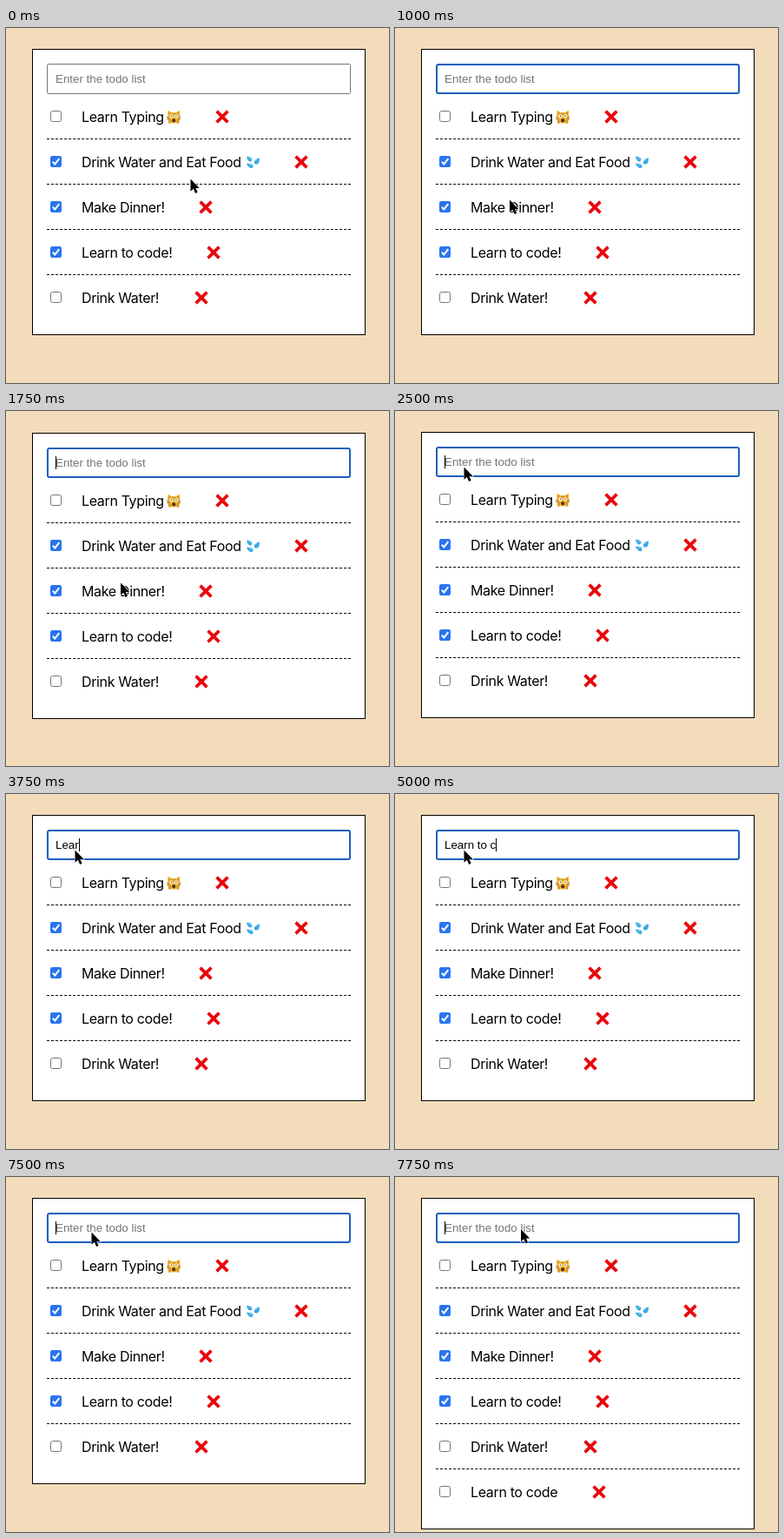
These frames come from a looping animation (441x408 px, 8000 ms). An HTML page:

```html
<!DOCTYPE html>
<html lang="en">
<head>
<meta charset="utf-8">
<title>Todo list</title>
<style>
  html, body { margin: 0; width: 100%; height: 100%; overflow: hidden; background: #f2dcb9; }
  svg { display: block; width: 441px; height: 408px; }
  .item { font: 16px Inter, sans-serif; letter-spacing: -0.35px; }
  .field { font: 13.333px "Liberation Sans", Arial, sans-serif; }
</style>
</head>
<body>
<svg viewBox="0 0 441 408">
  <defs>
    <g id="cross" stroke="#ea060b" stroke-width="3.7">
      <path d="M-6.4-6.4 6.4 6.4M6.4-6.4-6.4 6.4"/>
    </g>
    <g id="off">
      <rect x="51.5" y="-6.5" width="12" height="12" rx="2.2" fill="#fff" stroke="#767676"/>
    </g>
    <g id="on">
      <rect x="51" y="-7" width="13" height="13" rx="2.2" fill="#2874f0"/>
      <path d="M53.8-.3 56.4 2.4 61.3-3.8" fill="none" stroke="#fff" stroke-width="2"/>
    </g>
    <g id="cat">
      <path d="M1.4.6 6 3.2H10.4L15 .6 15.4 9Q14.5 15.5 8.2 15.6 2 15.5 1 9Z" fill="#f4b92f"/>
      <path d="M2.3 2.2 4.8 3.8 2.4 6ZM14.1 2.2 11.6 3.8 14 6Z" fill="#c98a3c"/>
      <path d="M6.8 3.3 7.4 5.4M9.6 3.3 9 5.4M0 8.2 3 9M0 10.6 3 10.4M16.4 8.2 13.4 9M16.4 10.6 13.4 10.4" stroke="#8a5a20" stroke-width=".7"/>
      <circle cx="5.4" cy="7.3" r="1.9" fill="#fff"/><circle cx="11" cy="7.3" r="1.9" fill="#fff"/>
      <circle cx="5.5" cy="7.3" r=".8" fill="#333"/><circle cx="10.9" cy="7.3" r=".8" fill="#333"/>
      <ellipse cx="8.2" cy="12.2" rx="2" ry="2.3" fill="#55301c"/>
      <path d="M2.4 15.8Q1 11.8 3.2 10L5.2 11.5 4.6 15.8ZM14 15.8Q15.4 11.8 13.2 10L11.2 11.5 11.8 15.8Z" fill="#d9992a"/>
    </g>
    <g id="drops" fill="#35a8e6">
      <path d="M1 1.5Q7.5 2 7.3 5.4 6.8 8 4.3 7.3 1.8 6.2 1 1.5Z"/>
      <path d="M15.8 3.2Q16.4 9.6 13 10.6 9.8 10.8 9.7 8 10 5.2 15.8 3.2Z"/>
      <path d="M.8 9.8Q6.6 9.2 8.2 11.6 9.2 14.6 6.6 15.2 3.4 15.2.8 9.8Z"/>
      <path d="M11 6.8Q11.6 5.8 13.2 5.2M3.6 3.4Q5.2 3.6 5.6 4.8M4 11.2Q6 11.2 6.8 12.4" fill="none" stroke="#a9def8" stroke-width=".9"/>
    </g>
  </defs>
  <rect width="441" height="408" fill="#f2dcb9"/>
  <g id="page">
    <rect id="card" x="30.5" y="24.5" width="383" height="328" fill="#fff" stroke="#000"/>
    <rect id="box" fill="#fff"/>
    <text id="entry" class="field" x="57" y="63" xml:space="preserve"></text>
    <rect id="caret" y="51" width="1" height="15"/>
    <g id="list"></g>
  </g>
  <path id="arrow" d="M0 0V14.2L3.3 11.3 5.6 16.4 8.1 15.3 5.9 10.4H10.2Z" fill="#000" stroke="#fff" stroke-width="1.1" paint-order="stroke"/>
</svg>
<script>
const LOOP = 8000, STEP = 250, ROW = 52;
const $ = id => document.getElementById(id);
const set = (el, attrs) => { for (const k in attrs) el.setAttribute(k, attrs[k]); };

// label, checked, cross centre, emoji, emoji x
const items = [
  ["Learn Typing", false, 249, "cat", 185],
  ["Drink Water and Eat Food", true, 340, "drops", 276],
  ["Make Dinner!", true, 230],
  ["Learn to code!", true, 239],
  ["Drink Water!", false, 225],
  ["Learn to code", false, 235]
];

$("list").innerHTML = items.map(([label, done, cross, icon, x], i) => {
  const y = 102 + i * ROW;
  return `<g>
    ${i ? `<path d="M47 ${y - 26.5}H397" stroke="#000" stroke-dasharray="3 2.03"/>` : ""}
    <use href="#${done ? "on" : "off"}" y="${y}"/>
    <text class="item" x="87" y="${y + 6}">${label}</text>
    ${icon ? `<use href="#${icon}" x="${x}" y="${y - 8}"/>` : ""}
    <use href="#cross" x="${cross}" y="${y}"/>
  </g>`;
}).join("");
const added = $("list").lastElementChild;

// time, x, y of the pointer
const moves = [
  [0, 212.5, 173.5], [250, 176, 112], [500, 134, 62], [750, 132, 130], [1000, 132, 197.5],
  [2000, 118, 160], [2250, 92, 96], [2500, 79.5, 64.5],
  [7250, 84, 64.5], [7500, 98.5, 63.5], [7750, 145, 60]
];
// time, typed length
const phrase = "Learn to code";
const keys = [
  [0, 0], [3000, 1], [3250, 2], [3500, 3], [3750, 4], [4000, 5], [4250, 6],
  [4750, 8], [5000, 10], [5250, 11], [5500, 13], [7250, 0]
];
const at = (track, t) => track.filter(k => k[0] <= t).pop();

function caretOn(t) {
  if (t < 500) return false;
  if (t < 3000) return (t - 500) % 1000 < 500;
  if (t < 5500) return true;
  if (t < 7250) return (t - 5500) % 1000 < 500;
  return true;
}

function draw(time) {
  const t = Math.floor(time % LOOP / STEP) * STEP;
  const focus = t >= 500, full = t >= 7750;
  const text = phrase.slice(0, at(keys, t)[1]);
  const [, x, y] = at(moves, t);

  set($("page"), { transform: `translate(0 ${t >= 1500 && t < 2250 ? 1 : 0})` });
  set($("card"), { height: full ? 328 + ROW : 328 });
  added.style.display = full ? "" : "none";
  set($("box"), focus
    ? { x: 48, y: 42, width: 348, height: 33, rx: 2, stroke: "#1c5fbd", "stroke-width": 2 }
    : { x: 47.5, y: 41.5, width: 349, height: 34, rx: 1, stroke: "#767676", "stroke-width": 1 });

  const entry = $("entry");
  entry.textContent = text || "Enter the todo list";
  set(entry, { fill: text ? "#000" : "#757575" });
  const end = text ? entry.getComputedTextLength() : 0;
  set($("caret"), { x: Math.round(57 + end), visibility: caretOn(t) ? "visible" : "hidden" });
  set($("arrow"), { transform: `translate(${x} ${y})` });
}

const start = performance.now();
function tick() {
  draw(performance.now() - start);
  requestAnimationFrame(tick);
}
tick();
</script>
</body>
</html>
```
